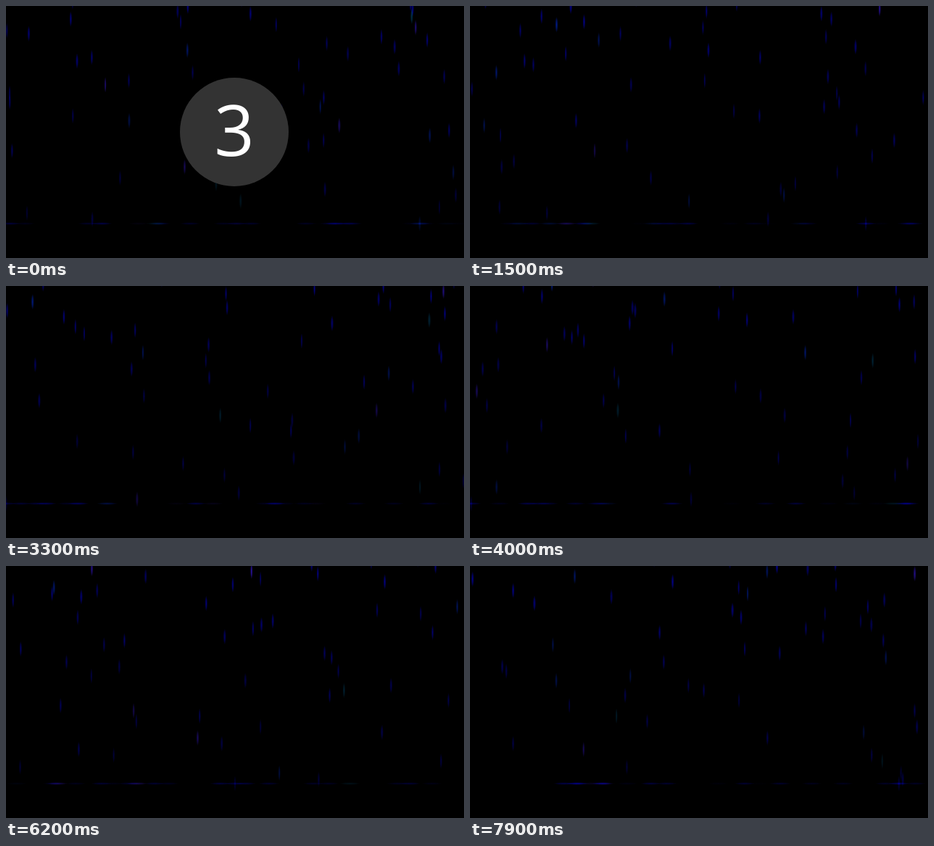
Recreate the animation shown at these times as an HTML page with a canvas. Size 632 by 348 pixels, loop 8 s.

```html
<!DOCTYPE html>
<html lang="en">
<head>
<meta charset="utf-8">
<title>Blue rain</title>
<style>
  html, body { margin: 0; width: 100%; height: 100%; overflow: hidden; background: #000; }
  canvas { display: block; }
</style>
</head>
<body>
<canvas id="stage" width="632" height="348"></canvas>
<script>
const W = 632, H = 348, LOOP = 8000, STEP = 100;
const TICKS = 6;          // drops born per step
const TOP = -50, GROUND = 300.5, GRAVITY = 0.0525;
const FIRST_AGE = 27, LAND_AGE = 82, SPLASH_LIFE = 24;
const ctx = document.getElementById('stage').getContext('2d');

// Repeatable random value in 0..1 for a drop and a channel
function rand(id, channel) {
  let h = Math.imul(id + 1013, 0x9E3779B1) ^ Math.imul(channel + 17, 0x85EBCA6B);
  h = Math.imul(h ^ (h >>> 15), 0x2C1B3C6D);
  h = Math.imul(h ^ (h >>> 12), 0x297A2D39);
  return ((h ^ (h >>> 15)) >>> 0) / 4294967296;
}

function dropColor(id) {
  const kind = rand(id, 2);
  if (kind < 0.07) return '42,18,165';
  if (kind < 0.18) return '0,28,140';
  if (kind < 0.21) return '0,52,80';
  return '2,1,140';
}

function glow(x, y, rx, ry, color, alpha) {
  const g = ctx.createRadialGradient(0, 0, 0, 0, 0, 1);
  g.addColorStop(0, `rgba(${color},${alpha})`);
  g.addColorStop(0.55, `rgba(${color},${alpha * 0.65})`);
  g.addColorStop(1, `rgba(${color},0)`);
  ctx.save();
  ctx.translate(x, y);
  ctx.scale(rx, ry);
  ctx.fillStyle = g;
  ctx.fillRect(-1, -1, 2, 2);
  ctx.restore();
}

function drawDrop(id, age) {
  const x = rand(id, 1) * W, color = dropColor(id);
  const y = Math.min(GROUND, TOP + GRAVITY * age * age);
  const light = 0.65 + 0.3 * rand(id, 3);
  if (age <= LAND_AGE) {
    const fade = 1.1 - (age - FIRST_AGE) * 0.011;
    glow(x, y, 1.5 + rand(id, 4) * 0.6, 11, color, light * fade);
  }
  if (age >= LAND_AGE) {
    const left = 1 - (age - LAND_AGE) / SPLASH_LIFE;
    glow(x, GROUND, 14, 1.6, color, light * left * 0.6);
  }
}

function drawCount() {
  ctx.fillStyle = '#333';
  ctx.beginPath();
  ctx.arc(315, 174, 75, 0, Math.PI * 2);
  ctx.fill();
  ctx.fillStyle = '#fff';
  ctx.font = '97px "Open Sans", "Noto Sans", sans-serif';
  ctx.textAlign = 'center';
  ctx.fillText('3', 315, 207);
}

function render(time) {
  const step = Math.floor((time % LOOP) / STEP);
  ctx.globalCompositeOperation = 'source-over';
  ctx.fillStyle = '#000';
  ctx.fillRect(0, 0, W, H);
  ctx.globalCompositeOperation = 'lighter';
  for (let age = FIRST_AGE; age < LAND_AGE + SPLASH_LIFE; age++) {
    drawDrop(step * TICKS - age, age);
  }
  ctx.globalCompositeOperation = 'source-over';
  if (step === 0) drawCount();
}

const start = performance.now();
function frame() {
  render(performance.now() - start);
  requestAnimationFrame(frame);
}
frame();
</script>
</body>
</html>
```
